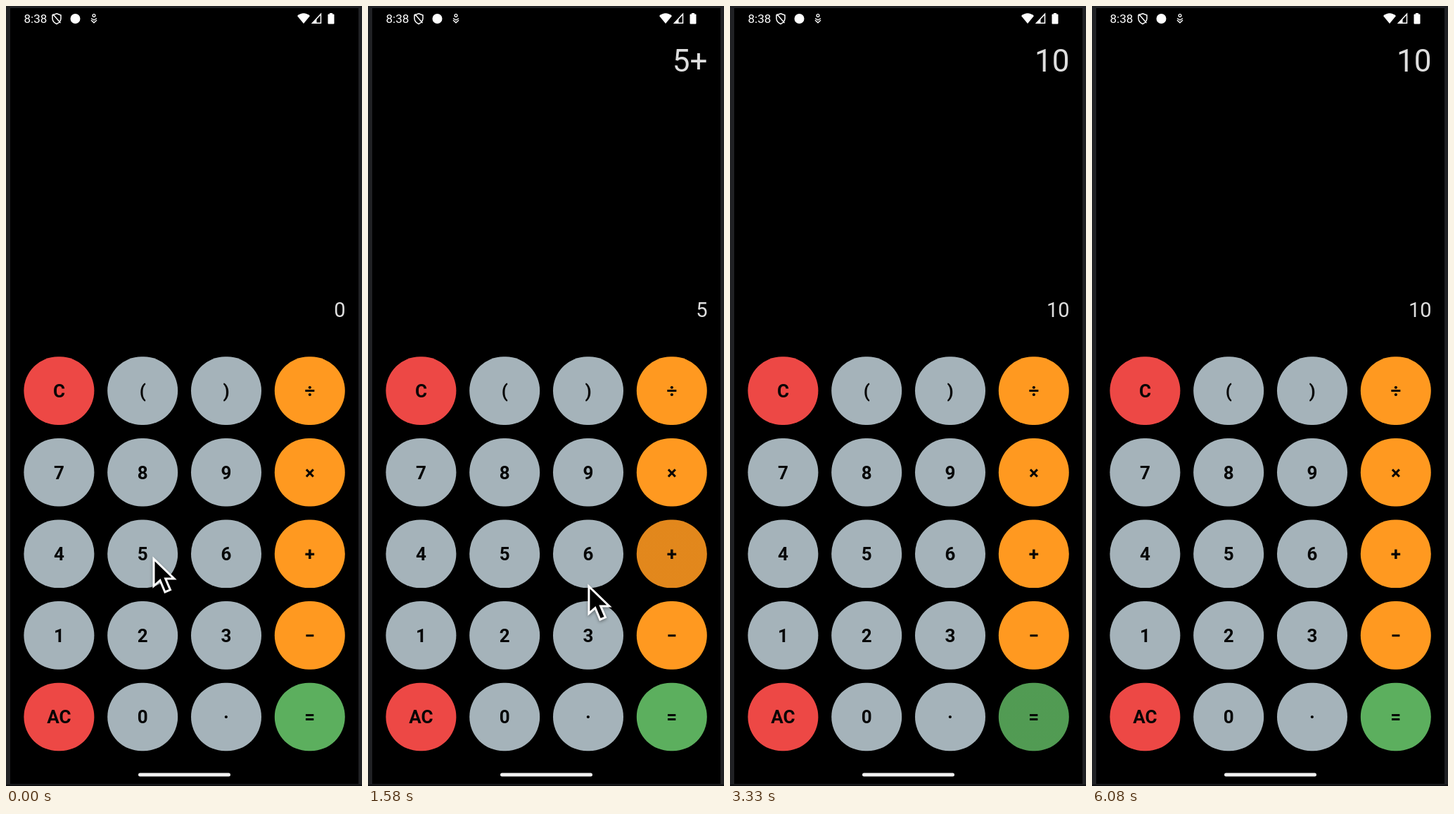
An HTML page for the animation above (6160 ms loop, 506 by 1106 pixels).

```html
<!DOCTYPE html>
<html lang="en">
<head>
<meta charset="utf-8">
<title>Calculator</title>
<style>
  html, body { margin: 0; width: 100%; height: 100%; overflow: hidden; background: #000; }
  svg { display: block; width: 100%; height: 100%; }
  text { font-family: Roboto, Arial, sans-serif; }
  .key { font-size: 26px; font-weight: 700; text-anchor: middle; fill: #060606; }
  .out { text-anchor: end; fill: #dedede; }
  #cursor { filter: drop-shadow(0 2px 2px rgba(0, 0, 0, .35)); }
</style>
</head>
<body>
<svg viewBox="0 0 506 1106">
  <defs>
    <radialGradient id="soft">
      <stop offset=".45" stop-color="#000"/>
      <stop offset="1" stop-color="#000" stop-opacity="0"/>
    </radialGradient>
  </defs>
  <rect width="506" height="1106" fill="#202124"/>
  <rect x="6" y="3" width="495" height="1100" fill="#000"/>
  <rect y="1104" width="506" height="2" fill="#101113"/>

  <g id="status" fill="#fff">
    <text x="25.5" y="24" font-size="17">8:38</text>
    <g fill="none" stroke="#fff" stroke-width="1.5">
      <path d="M72 10.8L78 13V18Q77.500 23 72 25.500Q66.500 23 66 18V13ZM66.500 11.500L77.500 24"/>
      <circle cx="125" cy="13.500" r="1.900" stroke-width="1.300"/>
      <path d="M121 17.500L125 20L129 17.500M121 20L125 23.800L129 20" stroke-width="1.400"/>
    </g>
    <circle cx="98.500" cy="18" r="7"/>
    <path d="M414 14Q423 6.500 432 14L423 25Z"/>
    <path d="M447.500 11.500V24.300H435.500Z" fill="none" stroke="#fff" stroke-width="1.500"/>
    <path d="M441.500 18V24.300H435.500Z"/>
    <path d="M460 10h4v1.500h1.500q1 0 1 1v12q0 1-1 1h-7q-1 0-1-1v-12q0-1 1-1h1.500z"/>
  </g>

  <text id="entry" class="out" x="482.500" y="93" font-size="44"></text>
  <text id="result" class="out" x="482.500" y="440.500" font-size="29"></text>
  <g id="keys"></g>
  <rect x="188" y="1087.500" width="131" height="5" rx="2.500" fill="#f2f2f2"/>
  <path id="cursor" d="M2 4V42.500L11 34.500L18 51L25.500 47.800L18.700 32H31Z"
        fill="#000" stroke="#fff" stroke-width="3"/>
</svg>
<script>
const LOOP = 6160, STEP = 1000 / 12;
const $ = id => document.getElementById(id);
const GRAY = '#a5b3ba', RED = '#ed4845', ORANGE = '#ff9920', GREEN = '#5caf5e';
const ROWS = ['C ( ) ÷', '7 8 9 ×', '4 5 6 +', '1 2 3 −', 'AC 0 · ='];

// label, press time, touch point
const PRESSES = [
  ['5', 225, 208, 780],
  ['+', 1130, 434, 783],
  ['5', 2130, 217, 778],
  ['=', 2940, 435, 988]
];
// time, entry line, result line
const LINES = [
  [0, '', '0'],
  [320, '5', '5'],
  [1240, '5+', '5'],
  [2240, '5+5', '10'],
  [3040, '10', '10']
];
// time, pointer tip
const PATH = [
  [0, 208, 780], [400, 208, 780], [670, 375, 835], [1000, 434, 783],
  [1300, 434, 783], [1583, 312, 819], [2000, 217, 778], [2333, 217, 778],
  [2500, 355, 805], [2667, 478, 868], [2750, 474, 910], [2917, 435, 988],
  [4600, 435, 988], [5000, 440, 1033], [5300, 440, 1033]
];
const SHOWN = [[0, 3160], [4320, 5300]];

function add(parent, tag, attrs) {
  const el = document.createElementNS('http://www.w3.org/2000/svg', tag);
  for (const name in attrs) el.setAttribute(name, attrs[name]);
  return parent.appendChild(el);
}

function set(el, attrs) {
  for (const name in attrs) el.setAttribute(name, attrs[name]);
}

function keyColor(row, col) {
  if (col === 3) return row === 4 ? GREEN : ORANGE;
  return col === 0 && (row === 0 || row === 4) ? RED : GRAY;
}

const keys = {};
ROWS.forEach((line, row) => line.split(' ').forEach((label, col) => {
  const x = 75.4 + col * 118.8, y = 545.6 + row * 115.6;
  const box = { x: x - 50, y: y - 48.3, width: 100, height: 96.6, rx: 48.3 };
  const clip = add(document.querySelector('defs'), 'clipPath', { id: `k${row}${col}` });
  add(clip, 'rect', box);
  add($('keys'), 'rect', { ...box, fill: keyColor(row, col) });
  const ink = add($('keys'), 'g', { 'clip-path': `url(#k${row}${col})` });
  add($('keys'), 'text', { class: 'key', x, y: y + 9.4 }).textContent = label;
  keys[label] = { x, y, ink };
}));

const ripples = PRESSES.map(([label, start, px, py]) => {
  const { x, y, ink } = keys[label];
  return { x, y, px, py, start, el: add(ink, 'circle', { fill: 'url(#soft)', opacity: 0 }) };
});

const clamp = v => Math.min(1, Math.max(0, v));
const mix = (a, b, p) => a + (b - a) * p;

function drawRipple(r, t) {
  const age = t - r.start;
  const grow = 1 - (1 - clamp(age / 450)) ** 2;
  const fade = clamp(age / 75) * (1 - clamp((age - 455) / 375));
  set(r.el, {
    cx: mix(r.px, r.x, grow),
    cy: mix(r.py, r.y, grow),
    r: 112 * grow,
    opacity: 0.115 * fade
  });
}

function pointerAt(t) {
  const i = PATH.findIndex(p => p[0] > t);
  if (i < 0) return PATH[PATH.length - 1].slice(1);
  const [t0, x0, y0] = PATH[i - 1], [t1, x1, y1] = PATH[i];
  const p = (t - t0) / (t1 - t0);
  return [mix(x0, x1, p), mix(y0, y1, p)];
}

function draw(now) {
  // the screen advances twelve times a second
  const t = Math.floor((now % LOOP + 4) / STEP) * STEP;
  const [, entry, result] = LINES.filter(l => l[0] <= t).pop();
  $('entry').textContent = entry;
  $('result').textContent = result;
  ripples.forEach(r => drawRipple(r, t));
  const shown = SHOWN.some(([from, to]) => t >= from && t < to);
  set($('cursor'), {
    transform: `translate(${pointerAt(t)})`,
    visibility: shown ? 'visible' : 'hidden'
  });
}

const begin = performance.now();
function tick() {
  draw(performance.now() - begin);
  requestAnimationFrame(tick);
}
tick();
</script>
</body>
</html>
```
